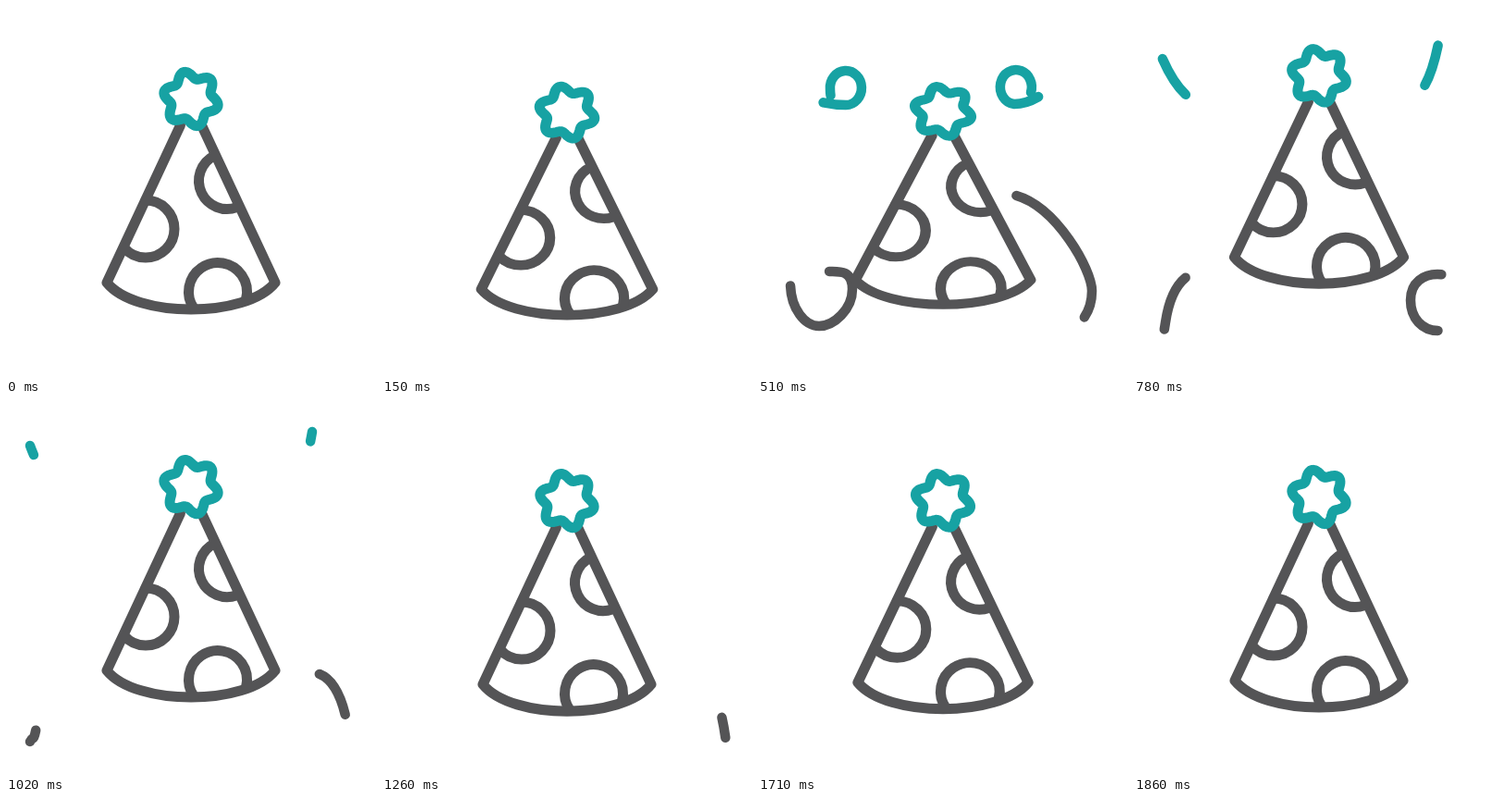
Write an HTML page with a canvas that moves like this. It is 400 px wide and 400 px high and loops after 2.89 s.

```html
<!DOCTYPE html>
<html lang="en">
<head>
<meta charset="utf-8">
<title>Party hat</title>
<style>
  html, body { margin: 0; width: 100%; height: 100%; overflow: hidden; background: #fff; }
  canvas { display: block; width: 400px; height: 400px; }
</style>
</head>
<body>
<canvas id="stage" width="400" height="400"></canvas>
<script>
const ctx = document.getElementById('stage').getContext('2d');
const LOOP = 2890, STEP = 30;
const DARK = '#545456', TEAL = '#17a2a3';
const BASE = 333; // the hat squashes towards this line
const LAG = 220;  // a streamer's tail sets off this long after its head

const rad = deg => deg * Math.PI / 180;
const progress = (t, from, to) => Math.max(0, Math.min(1, (t - from) / (to - from)));
const ease = (t, from, to) => (1 - Math.cos(Math.PI * progress(t, from, to))) / 2;
const bump = (t, from, peak, to) => ease(t, from, peak) - ease(t, peak, to);
const easeOut = u => 1 - (1 - u) ** 3;

function streamer(color, start, span, d) {
  const shape = document.createElementNS('http://www.w3.org/2000/svg', 'path');
  shape.setAttribute('d', d);
  return { color, start, span, path: new Path2D(d), len: shape.getTotalLength() };
}

// Each flies out in a sweep, curls through a loop and leaves outwards.
const streamers = [
  streamer(TEAL, 165, 960,
    'M134 179 C112 152 78 121 78 90 A17 18.5 0 1 1 95 107 C86 107 78 106 69 104 C56 101 38 78 26 45'),
  streamer(TEAL, 165, 960,
    'M260 185 C272 160 294 128 294 96 A17 18.5 0 1 0 277 106 C287 106 297 102 305 97 C317 89 326 60 331 30'),
  streamer(DARK, 165, 960,
    'M109 205 C66 209 35 255 35 300 C35 326 50 346 66 346 S102 328 102 306 S86 287 74 287 C50 287 38 315 34 342 S29 358 26 365'),
  streamer(DARK, 285, 1290,
    'M275 204 C320 213 361 284 361 308 C361 332 346 351 329 351 S299 338 299 318 S314 290 328 290 C356 290 367 325 372 366')
];

function drawStreamer({ color, start, span, path, len }, t) {
  const lead = progress(t, start, start + span);
  const trail = progress(t, start + LAG, start + LAG + span);
  if (lead === 0 || trail === 1) return;
  const tail = len * easeOut(trail);
  const head = len * easeOut(lead);
  ctx.strokeStyle = color;
  ctx.lineWidth = 10.5 * Math.min(1, 4.5 * (1 - trail));
  ctx.setLineDash([Math.max(0.1, head - tail), 2 * len]);
  ctx.lineDashOffset = -tail;
  ctx.stroke(path);
  ctx.setLineDash([]);
}

function spot(x, y, r, from, to, ccw) {
  ctx.beginPath();
  ctx.arc(x, y, r, rad(from), rad(to), ccw);
  ctx.stroke();
}

function drawStar(x, y) {
  ctx.beginPath();
  for (let a = 0; a < 360; a += 3) {
    const r = 26 + 4 * Math.cos(rad(6 * (a - 15)));
    ctx.lineTo(x + r * Math.cos(rad(a)), y + r * Math.sin(rad(a)));
  }
  ctx.closePath();
  ctx.stroke();
}

function drawHat(t) {
  const crouch = bump(t, 0, 360, 900);
  const settle = bump(t, 1260, 1560, 1860);
  const lift = 14 * ease(t, 0, 330) - 43 * ease(t, 330, 710)
    + 33.5 * ease(t, 710, 1300) - 4.5 * ease(t, 1500, 1860);

  ctx.save();
  ctx.translate(200, BASE + lift);
  ctx.scale(1 + 0.05 * crouch + 0.024 * settle, 1 - 0.1 * crouch - 0.019 * settle);
  ctx.translate(-200, -BASE);
  ctx.lineWidth = 11;
  ctx.strokeStyle = DARK;

  ctx.beginPath();
  ctx.moveTo(188.5, 129);
  ctx.lineTo(109, 299);
  ctx.bezierCurveTo(140, 337.7, 260, 337.7, 291, 299);
  ctx.lineTo(211.5, 129);
  ctx.stroke();

  spot(151, 241, 31, -90, 139);
  spot(239, 189, 30.5, 244, 70, true);
  spot(229, 309, 31.5, 145, 374);

  ctx.strokeStyle = TEAL;
  drawStar(200, 100.5);
  ctx.restore();
}

function draw(t) {
  ctx.fillStyle = '#fff';
  ctx.fillRect(0, 0, 400, 400);
  ctx.lineCap = ctx.lineJoin = 'round';
  for (const s of streamers) drawStreamer(s, t);
  drawHat(t);
}

const begin = performance.now();
function tick() {
  const t = (performance.now() - begin) % LOOP;
  draw(Math.floor(t / STEP) * STEP);
  requestAnimationFrame(tick);
}
tick();
</script>
</body>
</html>
```
